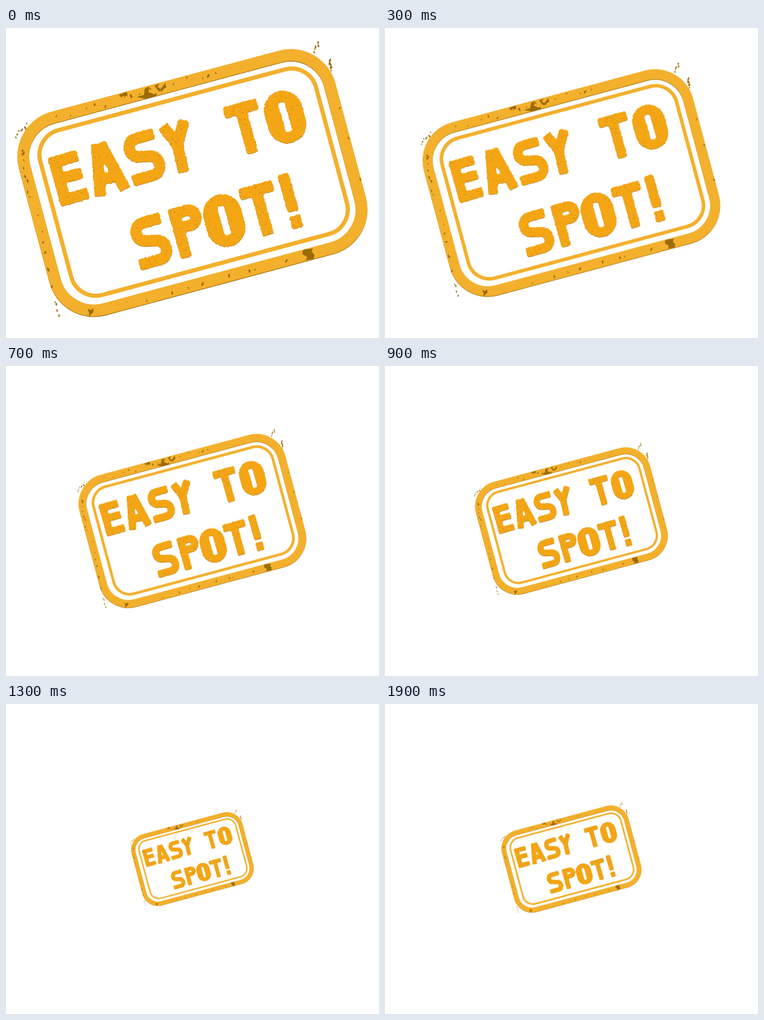
An HTML page that plays this animation: 822 by 682 pixels, repeating every 2 s.

```html
<!DOCTYPE html>
<html lang="en">
<head>
<meta charset="utf-8">
<title>Easy to spot!</title>
<style>
  html, body { margin: 0; width: 100%; height: 100%; overflow: hidden; background: #fff; }
  svg { display: block; width: 822px; height: 682px; }
  #stamp { transform-origin: 411px 341px; animation: pulse 2s infinite; }
  @keyframes pulse {
    0%   { transform: scale(1);   animation-timing-function: steps(15, end); }
    75%  { transform: scale(.25); animation-timing-function: linear; }
    80%  { transform: scale(.25); animation-timing-function: steps(4, end); }
    100% { transform: scale(.45); }
  }
</style>
</head>
<body>
<svg viewBox="0 0 822 682" role="img" aria-label="EASY TO SPOT!">
  <defs>
    <rect id="band" x="-348" y="-219" width="696" height="436.5" rx="88.6"
          transform="translate(411 341) rotate(-15)" fill="none" stroke-width="26"/>
    <!-- rounds the stroke ends, frays the edges, adds ink and a dark lower rim -->
    <filter id="ink" color-interpolation-filters="sRGB">
      <feGaussianBlur in="SourceAlpha" stdDeviation="2.2"/>
      <feComponentTransfer><feFuncA type="linear" slope="5" intercept="-2"/></feComponentTransfer>
      <feComponentTransfer result="smooth"><feFuncA type="linear" slope="1"/></feComponentTransfer>
      <feTurbulence type="fractalNoise" baseFrequency=".2" numOctaves="2" seed="4" result="noise"/>
      <feDisplacementMap in="smooth" in2="noise" scale="4" xChannelSelector="R" yChannelSelector="G" result="shape"/>
      <feFlood flood-color="#a9741a"/>
      <feComposite in2="shape" operator="in"/>
      <feOffset dx=".4" dy="1.2" result="rim"/>
      <feFlood flood-color="#f5a614"/>
      <feComposite in2="shape" operator="in" result="face"/>
      <feMerge><feMergeNode in="rim"/><feMergeNode in="face"/></feMerge>
    </filter>
  </defs>
  <g id="stamp">
    <use href="#band" y="1.6" stroke="#a3771c"/>
    <use href="#band" stroke="#f3b02c"/>
    <rect x="-311.6" y="-188.7" width="629" height="375" rx="56" fill="none"
          transform="translate(411 341) rotate(-15)" stroke="#f3b02c" stroke-width="9.2"/>
    <g filter="url(#ink)">
      <g id="words" transform="translate(411 341) rotate(-15.8)" fill="none" stroke="#000" stroke-width="24.5"/>
    </g>
    <g transform="translate(411 341) rotate(-15.8)" fill="none" stroke-linecap="round">
      <path id="pits" stroke="#b98222" stroke-width="1.4"/>
      <path id="holes" stroke="#fff0cc" stroke-width="1.1"/>
    </g>
    <g fill="#9c6b0a">
      <path id="flecks"/>
      <path d="M249 147L266 140 268 150 258 149 254 153ZM288 152L304 147 306 133 315 129 314 141 327 146 332 142 331 150 309 156Z
        M327 127L338 122 334 130 341 134 351 121 353 131 337 140Z
        M653 491L658 487 676 485 674 492 680 500 678 508 660 511 664 504 654 498Z
        M180 617L187 621 192 616 193 625 186 631 183 637 183 626Z"/>
    </g>
  </g>
</svg>
<script>
const NS = 'http://www.w3.org/2000/svg';
const $ = id => document.getElementById(id);

let seed = 41;
const rnd = () => (seed = seed * 16807 % 2147483647) / 2147483647;
const spread = n => (rnd() * 2 - 1) * n;

// Pen strokes of each letter around its own centre
const strokes = {
  E: 'M33-43H-20V43H33M-20-4H32',
  A: 'M-28 57L-5-56M29 57L3-56M-20 23H20',
  S: 'M33-44H-8C-34-44-34-4-8-3L8 1C34 2 34 44 8 44H-39',
  Y: 'M-23-54L-3-6L-6 56M26-54L-3-6',
  T: 'M-38-45H38M-1-45V57',
  O: 'M-30-15A30 31 0 0 1 30-15V15A30 31 0 0 1-30 15ZM-20-33V33M20-33V33',
  P: 'M-22 56V-44H5C28-44 28-10 5-10H-22',
  '!': 'M0-63V22M0 32V60'
};
const rows = [
  { text: 'EASYTO', y: -84.5, xs: [-260, -175, -86, -6, 147, 236] },
  { text: 'SPOT!', y: 98, xs: [-122, -35, 45, 131, 197] }
];

const pen = document.createElement('canvas').getContext('2d');
pen.lineWidth = 22;
const dot = (x, y, len) => `M${x.toFixed(1)} ${y.toFixed(1)}l${len.toFixed(1)} .2`;

let pits = '', holes = '';
function drawLetter(name, cx, cy) {
  const glyph = document.createElementNS(NS, 'path');
  glyph.setAttribute('d', strokes[name]);
  glyph.setAttribute('transform', `translate(${cx} ${cy})`);
  $('words').append(glyph);

  const area = new Path2D(strokes[name]);
  const worn = 'EYTP!'.includes(name);
  for (let i = 0; i < (worn ? 170 : 60); i++) {
    const x = spread(42), y = spread(60);
    if (!pen.isPointInStroke(area, x, y)) continue;
    pits += dot(cx + x, cy + y, rnd() * 1.4);
    if (worn && i % 3 === 0) holes += dot(cx + x - .3, cy + y + .6, .3);
  }
}
for (const { text, y, xs } of rows) xs.forEach((x, i) => drawLetter(text[i], x, y));
$('pits').setAttribute('d', pits);
$('holes').setAttribute('d', holes);

// A sharp, slightly upright splinter
function fleck(x, y, r) {
  const lean = spread(.5);
  const pts = [0, 1, 2, 3].map(i => {
    const a = i * Math.PI / 2, k = r * (.7 + rnd() * .6);
    const v = Math.sin(a) * k;
    return (x + Math.cos(a) * k * .55 + v * lean).toFixed(1) + ' ' + (y + v).toFixed(1);
  });
  return 'M' + pts.join('L') + 'Z';
}

// Worn stretches: from, to, number of flecks, scatter
const zones = [
  [105, 197, 490, 92, 15, 7],
  [33, 255, 55, 375, 10, 6],
  [70, 400, 102, 580, 6, 3],
  [295, 604, 625, 506, 8, 4],
  [727, 152, 786, 349, 3, 2],
  [674, 52, 692, 32, 5, 4],
  [713, 70, 718, 95, 5, 2],
  [20, 242, 48, 210, 6, 4],
  [107, 600, 118, 635, 4, 2]
];
let flecks = '';
for (const [x1, y1, x2, y2, count, scatter] of zones)
  for (let i = 0; i < count; i++) {
    const k = (i + rnd()) / count;
    flecks += fleck(x1 + (x2 - x1) * k + spread(scatter), y1 + (y2 - y1) * k + spread(scatter), 2.5 + rnd() * 2.5);
  }
$('flecks').setAttribute('d', flecks);
</script>
</body>
</html>
```
